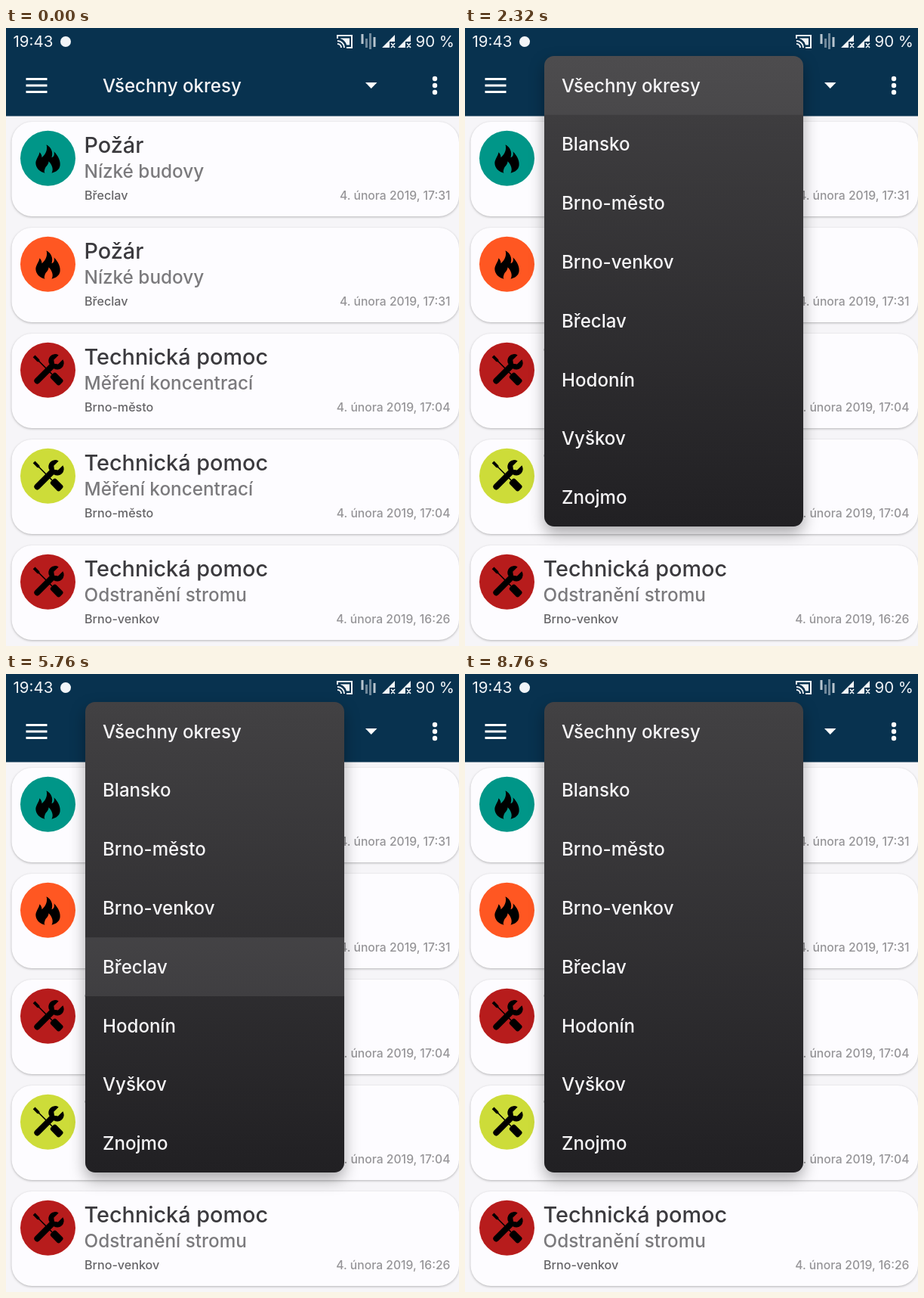
Recreate the animation shown at these times as an HTML page. Size 600x817 px, loop 8840 ms.

```html
<!DOCTYPE html>
<html lang="cs">
<head>
<meta charset="utf-8">
<title>Výběr okresu</title>
<style>
  html, body { margin: 0; width: 100%; height: 100%; overflow: hidden; background: #f6f5f8; }
  svg { display: block; width: 100vw; height: 100vh; font-family: Inter, Roboto, sans-serif; }
  .card { fill: #fdfcff; filter: drop-shadow(0 1.5px 1.5px #0004); }
  .title { font-size: 28.8px; font-weight: 500; fill: #3b3a3e; }
  .detail { font-size: 24.3px; font-weight: 500; fill: #7b7a7d; }
  .place { font-size: 16.1px; font-weight: 500; fill: #666568; }
  .date { font-size: 15.7px; font-weight: 500; fill: #969598; text-anchor: end; }
  .item { font-size: 24.1px; font-weight: 500; fill: #f6f5f7; }
  .status { font-size: 20.5px; fill: #f2f5f8; }
</style>
</head>
<body>
<svg viewBox="0 0 600 817">
  <defs>
    <linearGradient id="shade" x2="0" y2="1">
      <stop stop-color="#424143"/><stop offset="1" stop-color="#212023"/>
    </linearGradient>
    <clipPath id="reveal"><rect id="revealBox" x="80" width="420"/></clipPath>
    <clipPath id="rounded"><rect x="105" y="37" width="343" height="622" rx="13"/></clipPath>
    <path id="fire" d="M-2-18C5-14 7-8 5-1C8-2 9-5 8-9C14-3 17 4 16 10C15 15 11 18 5 19.500C8 14 5 8 1 4
      C1 9-3 10-4 14C-5 17-5 18-4 19.500C-10 18-15 14-16 8C-17 2-12-2-11-8C-9-6-8-4-8-1C-3-5 0-12-2-18Z"/>
    <g id="tools" transform="rotate(45)">
      <path d="M-26-2L-18-2L-16-.8H8V.8H-16L-18 2L-26 2Z"/>
      <rect x="8" y="-5" width="17" height="10" rx="3"/>
      <path d="M-4 20V-7A8.700 8.700 0 0 1-4-24V-15L0-12L4-15V-24A8.700 8.700 0 0 1 4-7V20A4 4 0 0 1-4 20Z"/>
    </g>
  </defs>

  <g id="cards"></g>
  <path fill="#08324f" d="M0 0H600V116.500H0Z"/>

  <g class="status">
    <text x="9.5" y="25">19:43</text>
    <circle cx="79" cy="18" r="7"/>
    <text x="594" y="25" text-anchor="end">90 %</text>
    <g fill="none" stroke="#f2f5f8" stroke-width="2">
      <path d="M439 14V10H458V26H451M439 17A9 9 0 0 1 448 26M439 21A5 5 0 0 1 444 26"/>
      <path d="M443 13.5H455V22.5H451A12 12 0 0 0 443 14Z" fill="#f2f5f8" stroke="none"/>
      <path d="M472 8V21M488 12V25" stroke-width="3" opacity=".75"/>
      <path d="M477.5 14V26M482.500 7V28" stroke-width="3" opacity=".45"/>
    </g>
    <path d="M498 26L515 9V18H508V26ZM519 26L536 9V18H529V26Z"/>
    <path d="M510 20L515 26M515 20L510 26M531 20L536 26M536 20L531 26" stroke="#f2f5f8" stroke-width="1.6"/>
  </g>

  <circle id="ripple" cx="484" cy="76" fill="#fff"/>
  <g fill="#fff">
    <path d="M26.500 67.500H54.500M26.500 76H54.500M26.500 84.500H54.500" stroke="#fff" stroke-width="3"/>
    <path d="M476 72H491.500L483.700 80Z"/>
    <circle cx="568" cy="67" r="3.2"/><circle cx="568" cy="76" r="3.2"/><circle cx="568" cy="85" r="3.2"/>
  </g>
  <text class="item" x="128" y="84.500">Všechny okresy</text>

  <g id="menu"><g clip-path="url(#reveal)"><g id="sheet"><g id="rows" clip-path="url(#rounded)">
    <rect x="105" y="37" width="343" height="622" fill="url(#shade)"/>
  </g></g></g></g>
</svg>
<script>
const LOOP = 8840, STEP = 40, ROW = 77.8;
const $ = id => document.getElementById(id);
const set = (el, attrs) => { for (const k in attrs) el.setAttribute(k, attrs[k]); };
const ramp = (t, from, to) => Math.min(1, Math.max(0, (t - from) / (to - from)));

const cards = [
  ['#009688', 'fire', 'Požár', 'Nízké budovy', 'Břeclav', '17:31'],
  ['#ff5722', 'fire', 'Požár', 'Nízké budovy', 'Břeclav', '17:31'],
  ['#b71c1c', 'tools', 'Technická pomoc', 'Měření koncentrací', 'Brno-město', '17:04'],
  ['#cddc39', 'tools', 'Technická pomoc', 'Měření koncentrací', 'Brno-město', '17:04'],
  ['#b71c1c', 'tools', 'Technická pomoc', 'Odstranění stromu', 'Brno-venkov', '16:26'],
];
$('cards').innerHTML = cards.map(([color, icon, title, detail, place, time], i) => `
  <g transform="translate(0 ${124 + 140 * i})">
    <rect class="card" x="7.5" width="592.5" height="125" rx="27"/>
    <circle cx="55.5" cy="48.3" r="36.5" fill="${color}"/>
    <use href="#${icon}" x="55.5" y="48.3"/>
    <text class="title" x="103.5" y="41">${title}</text>
    <text class="detail" x="103.5" y="74">${detail}</text>
    <text class="place" x="104" y="103">${place}</text>
    <text class="date" x="588.5" y="103">4. února 2019, ${time}</text>
  </g>`).join('');

// Each item: name, then press start, press end, release start, release end (ms).
const items = [
  ['Všechny okresy', 1880, 2080, 2200, 2520],
  ['Blansko', 2680, 2920, 3120, 3280],
  ['Brno-město', 3600, 3800, 3960, 4160],
  ['Brno-venkov', 4560, 4760, 4960, 5080],
  ['Břeclav', 5400, 5640, 5740, 5840],
  ['Hodonín', 6240, 6480, 6640, 6800],
  ['Vyškov', 7040, 7280, 7480, 7640],
  ['Znojmo', 7880, 8080, 8240, 8400],
];
$('rows').innerHTML += items.map(([name], i) => `
  <rect class="press" x="105" y="${37 + ROW * i}" width="343" height="${ROW}" fill="#fff"/>
  <text class="item" x="128" y="${84.5 + ROW * i}">${name}</text>`).join('');
const presses = document.querySelectorAll('.press');

// Cubic Bézier (.4, 0, .2, 1), solved by bisection.
function fastOutSlowIn(x) {
  let lo = 0, hi = 1;
  for (let i = 0; i < 20; i++) {
    const s = (lo + hi) / 2, r = 1 - s;
    if (1.2 * r * r * s + 0.6 * r * s * s + s ** 3 < x) lo = s; else hi = s;
  }
  return lo * lo * (3 - 2 * lo);
}

function draw(t) {
  set($('ripple'), {
    r: 12 + 17 * ramp(t, 760, 920),
    opacity: 0.2 * ramp(t, 760, 840) * (1 - ramp(t, 960, 1120)),
  });

  // The sheet slides out of the spinner while its clip grows from one row and its shadow deepens.
  const open = fastOutSlowIn(ramp(t, 852, 1102));
  set($('menu'), { opacity: ramp(t, 852, 952) });
  $('menu').style.filter = `drop-shadow(0 ${9 * open ** 2}px ${10 * open ** 2}px #0005)`;
  set($('sheet'), { transform: `translate(${24.6 * (1 - open)} ${-272 * (1 - open)})` });
  set($('revealBox'), { y: 37, height: 78 + 544 * open });

  items.forEach(([, on, full, off, end], i) => set(presses[i], {
    opacity: 0.12 * ramp(t, on, full) * (1 - ramp(t, off, end)) ** 1.5,
  }));
}

const start = performance.now();
function tick() {
  const t = (performance.now() - start) % LOOP;
  draw(Math.floor(t / STEP) * STEP);
  requestAnimationFrame(tick);
}
tick();
</script>
</body>
</html>
```
